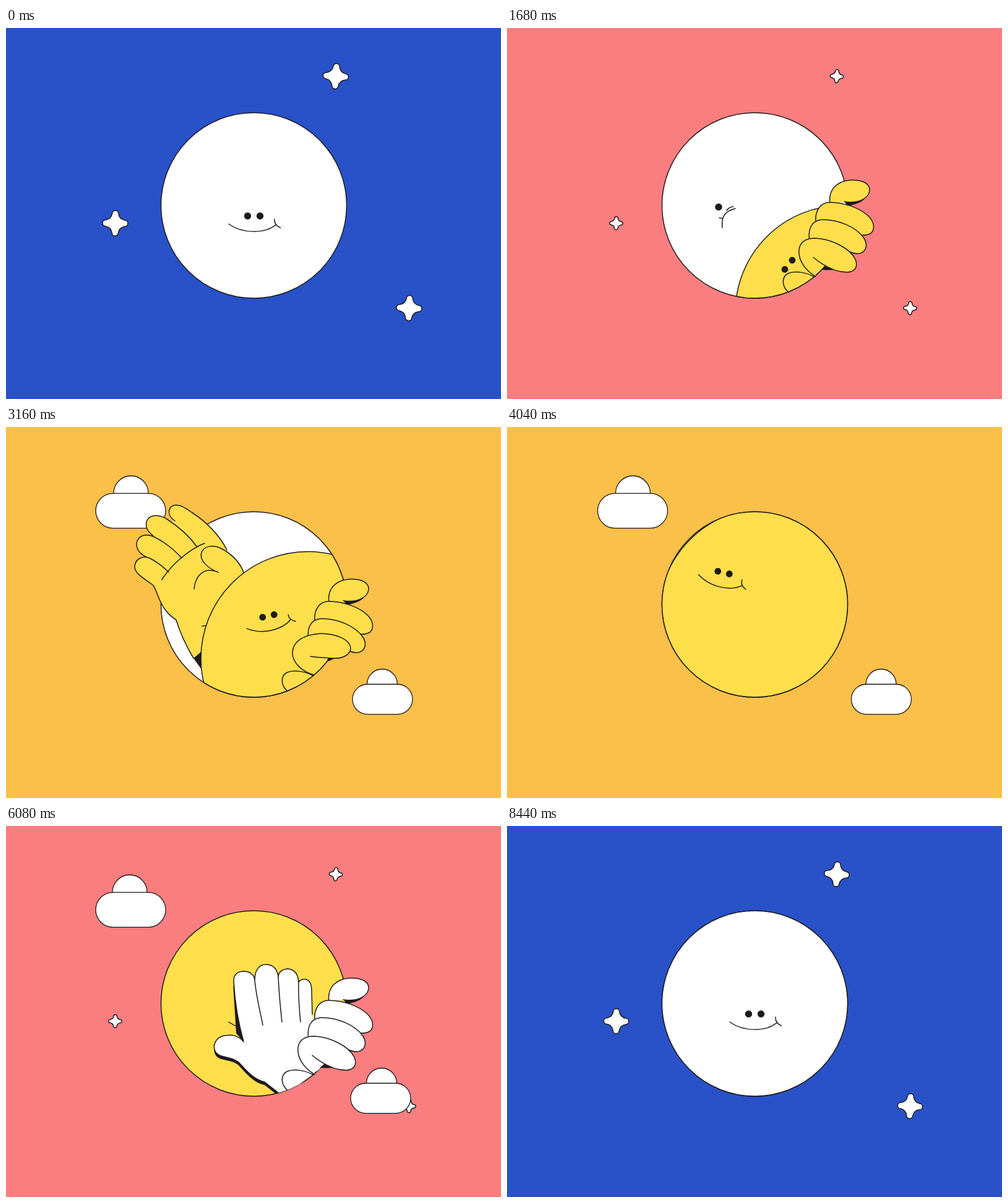
These frames come from a looping animation (800 px wide and 600 px high, 8480 ms). An HTML page:

```html
<!DOCTYPE html>
<html lang="en">
<head>
<meta charset="utf-8">
<title>Sun and moon</title>
<style>
  html, body { margin: 0; width: 100%; height: 100%; overflow: hidden; }
  svg { display: block; width: 800px; height: 600px; }
  .ink { stroke: #1d1a1b; stroke-width: 1.5; stroke-linecap: round; stroke-linejoin: round; }
  .ink * { vector-effect: non-scaling-stroke; }
  .line { fill: none; }
  .flat { stroke: none; }
  .dark { fill: #1d1a1b; stroke: none; }
</style>
</head>
<body>
<svg viewBox="0 0 800 600" class="ink">
  <defs>
    <clipPath id="hole"><circle cx="400.5" cy="287" r="150"/></clipPath>
    <clipPath id="risen"><circle id="risenDisc" r="173"/></clipPath>
    <g id="eyes">
      <circle class="dark" cx="-10" r="5.7"/>
      <circle class="dark" cx="10" r="5.7"/>
    </g>
    <path id="mouth" class="line" d="M-40.5 13C-18 29 18 29 36 14M33.5 5C33 11 36 16 43 19"/>
    <path id="palmShape" d="M441 432L418 414C400 410 388 395 376 382C362 371 346 376 339 366C332 355 340 341 353 339C365 337 375 338 384 349C376 320 370 290 368 250C368 239 376 235 384 235C395 235 401 241 402 249C402 232 410 224 420 224C432 224 438 231 440 243C441 236 447 231 456 231C466 232 472 238 473 253C474 249 480 247 485 248C492 250 494 257 494 267L495 305"/>
  </defs>
  <rect id="sky" class="flat" width="800" height="600"/>
  <g id="stars" fill="#fff"></g>
  <g id="cloudL" fill="#fff" stroke-width="1.3">
    <circle id="bumpL" cx="202" cy="107" r="28"/>
    <rect x="145" y="107.3" width="113" height="56.4" rx="28.2"/>
  </g>
  <g id="cloudR" fill="#fff" stroke-width="1.3">
    <circle id="bumpR" cx="608" cy="416" r="24.5"/>
    <rect x="560" y="416" width="97" height="48.6" rx="24.3"/>
  </g>

  <circle id="base" cx="400.5" cy="287" r="150"/>
  <g id="restFace" transform="translate(400.5 304)">
    <use href="#eyes"/><use href="#mouth"/>
  </g>
  <g id="sulk">
    <circle class="dark" cx="342" cy="289.5" r="5.7"/>
    <path class="line" d="M355 295C358 291 361 289 366 289M348 323C346 305 352 296 369 292M343 307L349 308"/>
  </g>

  <g id="wave" class="skin">
    <path class="flat" d="M272 150L357 199L385 240L340 364L303 374L275 312L240 257L228 211L238 176Z"/>
    <path d="M357 199C345 174 322 152 300 138C287 128 274 122 266 130C260 139 266 147 273 152"/>
    <path d="M308 193C293 172 274 158 260 149C246 140 231 142 227 153C225 163 229 169 238 176"/>
    <path d="M284 212C268 194 252 184 240 178C225 171 212 176 211 189C211 200 218 206 228 211"/>
    <path d="M263 235C250 222 240 216 232 212C220 207 208 214 208 227C209 238 225 246 238 256C246 268 248 295 275 312C282 335 290 352 303 374"/>
    <path d="M343 235C325 228 312 215 316 203C320 192 335 190 347 196C365 205 382 222 385 240"/>
    <path class="line" d="M304 262C306 240 320 228 337 233M252 247C265 225 295 198 321 188M317 322L325 321"/>
    <path class="dark" d="M303 374L316 363L316 392Z"/>
  </g>

  <g clip-path="url(#hole)">
    <g id="palm" class="skin">
      <use href="#palmShape" class="dark" y="5"/>
      <path class="dark" d="M367 256L372 335L384 349C376 315 373 285 367 256"/>
      <use href="#palmShape"/>
      <path class="flat" d="M441 432L540 400L494 304L450 320L430 410Z"/>
      <path class="line" d="M402 249C404 275 411 300 415 322M440 243C441 266 443 290 446 317M473 253C472 275 474 295 476 317"/>
    </g>
    <circle id="riser" class="skin" r="173"/>
    <g id="riserFace">
      <use href="#eyes"/><use id="riserMouth" href="#mouth"/>
    </g>
    <path id="thumb" class="skin" d="M456 428C444 419 443 403 454 397C466 392 484 395 497 403"/>
  </g>
  <g clip-path="url(#risen)"><circle class="line" cx="400.5" cy="287" r="150"/></g>

  <g id="grip" class="skin">
    <g>
      <path class="dark" d="M546 281C562 282 575 279 580 274C574 282 562 286 550 288Z"/>
      <path d="M522 284C519 262 532 248 555 246C575 245 587 252 586 263C584 277 566 284 545 281"/>
    </g>
    <path d="M499 312C498 296 506 282 522 282C545 282 570 291 584 304C594 314 595 326 588 332C578 338 562 334 550 330"/>
    <path d="M489 345C486 325 492 312 508 310C535 309 565 322 577 340C584 352 580 363 568 365C560 365 552 362 545 358"/>
    <g>
      <path id="shade" class="dark"/>
      <path id="index"/>
    </g>
  </g>
</svg>
<script>
const LOOP = 8480, STEP = 40, SWAP = 4960, FADE = 600;
const WHITE = '#fff', YELLOW = '#ffde4b';
const BLUE = [41, 82, 200], CORAL = [250, 126, 128], ORANGE = [251, 192, 73];
const FADES = [[960, CORAL], [1900, ORANGE], [5400, CORAL], [7180, BLUE]];

const $ = id => document.getElementById(id);
const set = (id, name, value) => $(id).setAttribute(name, value);
const place = (id, value) => set(id, 'transform', value);
const move = (id, x, y = 0) => place(id, `translate(${x} ${y})`);
const show = (id, on) => set(id, 'visibility', on ? 'visible' : 'hidden');

const clamp = p => Math.min(1, Math.max(0, p));
const mix = (a, b, p) => a + (b - a) * p;
const wave = (t, period) => Math.sin(2 * Math.PI * t / period);
function ramp(t, from, to) {
  const p = clamp((t - from) / (to - from));
  return p * p * (3 - 2 * p);
}

function morph(from, to, p) {
  const ends = to.match(/\d+/g);
  let i = 0;
  return from.replace(/\d+/g, n => mix(+n, +ends[i++], p));
}
const curl = p => morph(
  'M499,402C482,392 470,375 472,358C474,346 482,340 498,340C525,341 555,357 563,374C568,387 562,394 550,395C530,395 512,385 495,371',
  'M498,401C478,396 462,380 463,364C464,347 480,336 508,334C535,334 555,344 557,357C557,368 545,375 528,374C515,373 505,373 492,371', p);
const curlShade = p => morph(
  'M516,384L507,391C517,392 525,391 534,391Z',
  'M521,373L518,380C523,378 528,376 533,373Z', p);

// Four rounded arms made from one quarter.
function starPath() {
  let d = 'M-5,-16';
  for (let i = 0; i < 4; i++) {
    const turn = ([x, y]) => { for (let k = 0; k < i; k++) [x, y] = [-y, x]; return x + ',' + y; };
    d += 'C' + [[-5, -22], [5, -22], [5, -16]].map(turn).join(' ');
    d += 'C' + [[6, -9.5], [9.5, -6], [16, -5]].map(turn).join(' ');
  }
  return d + 'Z';
}
const stars = [[533, 78, 4], [176.5, 315.7, 1], [651.5, 453, 3]].map(spot => {
  const node = document.createElementNS('http://www.w3.org/2000/svg', 'path');
  node.setAttribute('d', starPath());
  $('stars').append(node);
  return { node, spot };
});

const ROOTS = [[525, 275], [505, 300], [495, 330], [490, 375]];
const fingers = [...$('grip').children];

function drawSky(t) {
  let sky = BLUE;
  for (const [at, next] of FADES)
    sky = sky.map((c, i) => mix(c, next[i], ramp(t, at, at + FADE)));
  set('sky', 'fill', `rgb(${sky.map(Math.round)})`);

  const small = ramp(t, 900, 1680) - ramp(t, 7240, 8440);
  const night = 1 - ramp(t, 1700, 2760) + ramp(t, 5500, 6060);
  const size = night * (1 - .48 * small + .12 * (1 - small) * wave(t, LOOP / 5));
  show('stars', size > .01);
  for (const { node, spot: [x, y, tilt] } of stars)
    node.setAttribute('transform', `translate(${x} ${y}) rotate(${tilt}) scale(${size})`);

  const off = 1 - ramp(t, 2100, 2913) + ramp(t, 6240, 6900);
  const sway = wave(t - 3160, 2920), bob = 2.4 * wave(t - 3160, 1760);
  move('cloudL', 1.6 * sway - 270 * off);
  move('cloudR', 400 * off - 3 * sway - 3 * ramp(t, 3160, 6080));
  move('bumpL', bob);
  move('bumpR', -bob);
}

// One body climbs into the disc; u is the time within its visit.
function drawRiser(u) {
  const climb = ramp(u, 1220, 2140), settle = ramp(u, 3300, 4338);
  const x = mix(mix(596, 488, climb), 400.5, settle);
  const y = mix(mix(545.5, 374.5, climb), 287, settle);
  move('riser', x, y);
  move('risenDisc', x, y);

  const home = ramp(u, 4240, 4700), level = ramp(u, 4040, 4400);
  const dx = mix(-64 - 5 * settle, 0, home) - 46 * (1 - climb);
  const dy = mix(-69, 17, level) - 16 * (1 - climb);
  const turn = -77 * (1 - climb) - 12.5 + 32 * settle - 19.5 * home;
  place('riserFace', `translate(${x + dx} ${y + dy}) rotate(${turn}) scale(${mix(.95, 1, home)})`);
  show('riserFace', u > 1220);
  show('riserMouth', u > 1760);
}

function drawHands(u, waves) {
  const hide = 1 - ramp(u, 1000, 1220) + ramp(u, 1380, 1620);
  move('palm', 120 * hide - 22 * ramp(u, 1290, 1400), 250 * hide);
  show('palm', hide < 1);

  const away = 1 - ramp(u, 2660, 2860) + ramp(u, 3600, 3900);
  const swing = 36 * wave(u - 3160, 533);
  place('wave', `translate(${170 * away} ${120 * away}) rotate(${swing} 320 375) translate(320 375) scale(${1 - .5 * away}) translate(-320 -375)`);
  show('wave', waves && away < 1);

  fingers.forEach((node, i) => {
    const v = u - i * 30, [x, y] = ROOTS[i];
    const s = ramp(v, 980, 1160) - ramp(v, 3560, 3800);
    node.setAttribute('transform', `translate(${x} ${y}) scale(${s}) translate(${-x} ${-y})`);
    node.setAttribute('visibility', s > .01 ? 'visible' : 'hidden');
  });
  const tuck = 1 - ramp(u, 1060, 1240) + ramp(u, 3560, 3800);
  move('thumb', 45 * tuck, 45 * tuck);
  show('thumb', tuck < 1);

  const lift = ramp(u, 2700, 2900);
  set('index', 'd', curl(lift));
  set('shade', 'd', curlShade(lift));
}

function draw(t) {
  const sunRising = t < SWAP;
  // The moon returns faster than the sun arrived.
  const u = sunRising ? t : t - 4800 + 1720 * clamp((t - 6480) / 840);
  const skin = sunRising ? YELLOW : WHITE;
  set('base', 'fill', sunRising ? WHITE : YELLOW);
  document.querySelectorAll('.skin').forEach(node => node.setAttribute('fill', skin));
  show('restFace', u < 1340);
  show('sulk', u >= 1340 && u < 4200);
  drawSky(t);
  drawRiser(u);
  drawHands(u, sunRising);
}

const start = performance.now();
function tick() {
  const t = (performance.now() - start) % LOOP;
  draw(Math.floor(t / STEP) * STEP);
  requestAnimationFrame(tick);
}
tick();
</script>
</body>
</html>
```
